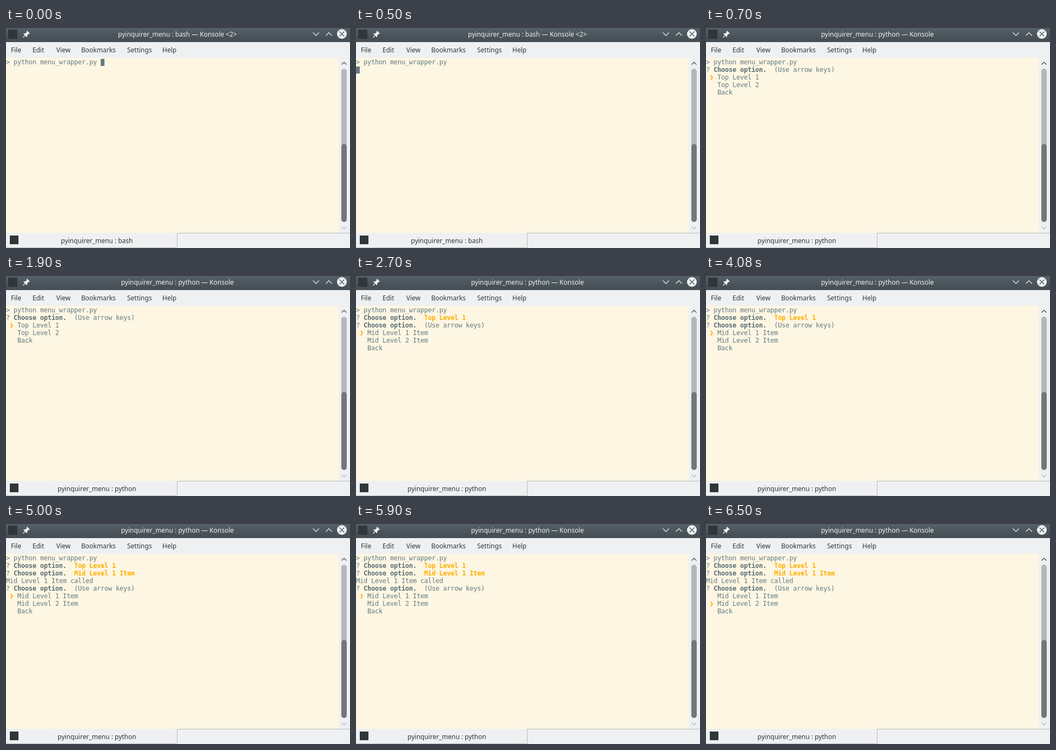
An HTML page with a canvas that plays this animation: 636 by 406 pixels, repeating every 8 s.

```html
<!DOCTYPE html>
<html>
<head>
<meta charset="utf-8">
<style>
  html, body { margin: 0; height: 100%; overflow: hidden; }
  canvas { display: block; }
</style>
</head>
<body>
<canvas width="636" height="406"></canvas>
<script>
const ctx = document.querySelector('canvas').getContext('2d');
const LOOP = 8000, CELL = 7, LINE = 14;
const PANEL = '#eff0f1', DARK = '#31363b', TEXT = '#657b83', STRONG = '#586e75', ACCENT = '#ffaf00';
const UI_FONT = '12px "Noto Sans", sans-serif';
const MONO = '12px "DejaVu Sans Mono", monospace';

function rect(color, x, y, w, h, radius = 0) {
  ctx.fillStyle = color;
  ctx.beginPath();
  ctx.roundRect(x, y, w, h, radius);
  ctx.fill();
}

function stroke(color, width, path) {
  ctx.strokeStyle = color;
  ctx.lineWidth = width;
  ctx.stroke(new Path2D(path));
}

function label(text, x, y, color, align = 'left') {
  ctx.font = UI_FONT;
  ctx.textAlign = align;
  ctx.fillStyle = color;
  ctx.fillText(text, x, y);
}

// Terminal text sits on a fixed character grid.
function put(row, col, text, color = TEXT, bold = false) {
  ctx.font = (bold ? 'bold ' : '') + MONO;
  ctx.textAlign = 'left';
  ctx.fillStyle = color;
  [...text].forEach((c, i) => ctx.fillText(c, (col + i) * CELL, 67 + row * LINE));
}

function cursor(row, col) {
  rect(TEXT, col * CELL, 57 + row * LINE, CELL, 13);
}

function question(row, answer) {
  put(row, 0, '?');
  put(row, 2, 'Choose option.', STRONG, true);
  if (answer) put(row, 18, answer, ACCENT, true);
  else put(row, 18, '(Use arrow keys)');
}

function menu(row, items, selected) {
  question(row);
  items.forEach((item, i) => put(row + 1 + i, 3, item));
  ctx.fillStyle = ACCENT;
  const y = 59 + (row + 1 + selected) * LINE;
  ctx.fill(new Path2D(`M8 ${y}h2l3 4.5l-3 4.5h-2l2.5 -4.5z`));
}

function titleBar(title) {
  const shade = ctx.createLinearGradient(0, 0, 0, 25);
  shade.addColorStop(0, '#556068');
  shade.addColorStop(0.8, '#475057');
  rect(shade, 0, 0, 636, 26);
  rect(DARK, 4, 3, 17, 17);
  label(title, 317, 16, PANEL, 'center');

  ctx.fillStyle = PANEL;
  ctx.fill(new Path2D('M39 5l5 5l-1 1l-1 -.3l-3 3l.2 2.3l-1 1l-6 -6l1 -1l2.3 .2l3 -3l-.5 -1.2z'));
  stroke(PANEL, 1.2, 'M35 14L31.5 17.5');
  stroke(PANEL, 1.2, 'M567.5 8.5l5.5 5.5l5.5 -5.5M591.5 14l5.5 -5.5l5.5 5.5');
  rect(PANEL, 612, 2, 18, 18, 9);
  stroke('#475057', 1.2, 'M616.5 6.5l9 9M625.5 6.5l-9 9');
}

function chrome(title, tab) {
  rect(PANEL, 0, 0, 636, 406);
  titleBar(title);
  [['File', 9], ['Edit', 49], ['View', 93], ['Bookmarks', 139], ['Settings', 224], ['Help', 289]]
    .forEach(([name, x]) => label(name, x, 45, DARK));
  rect('#fdf6e3', 0, 55, 615, 323);

  rect('#b5b8b9', 620, 75, 10, 283, 5);
  rect('#737778', 620, 214, 10, 144, 5);
  stroke(DARK, 1.1, 'M620.5 67.5l4.5 -4.5l4.5 4.5');
  stroke('#b0b3b5', 1.1, 'M620.5 366.5l4.5 4.5l4.5 -4.5');

  stroke('#b9bbbd', 1, 'M0 405.5H316.5V378.5H636');
  rect(DARK, 7, 383, 16, 16);
  label(tab, 168, 397, DARK, 'center');
}

function draw(t) {
  const program = t < 700 ? 'bash' : 'python';
  const tab = 'pyinquirer_menu : ' + program;
  chrome(tab + ' — Konsole' + (t < 700 ? ' <2>' : ''), tab);
  put(0, 0, '> python menu_wrapper.py');

  const midItems = ['Mid Level 1 Item', 'Mid Level 2 Item', 'Back'];
  if (t < 500) cursor(0, 25);
  else if (t < 700) cursor(1, 0);
  else if (t < 2700) menu(1, ['Top Level 1', 'Top Level 2', 'Back'], 0);
  else {
    question(1, 'Top Level 1');
    if (t < 5000) menu(2, midItems, 0);
    else {
      question(2, 'Mid Level 1 Item');
      put(3, 0, 'Mid Level 1 Item called');
      menu(4, midItems, t < 6500 ? 0 : 1);
    }
  }
}

const start = performance.now();
function tick() {
  draw((performance.now() - start) % LOOP);
  requestAnimationFrame(tick);
}
tick();
</script>
</body>
</html>
```
